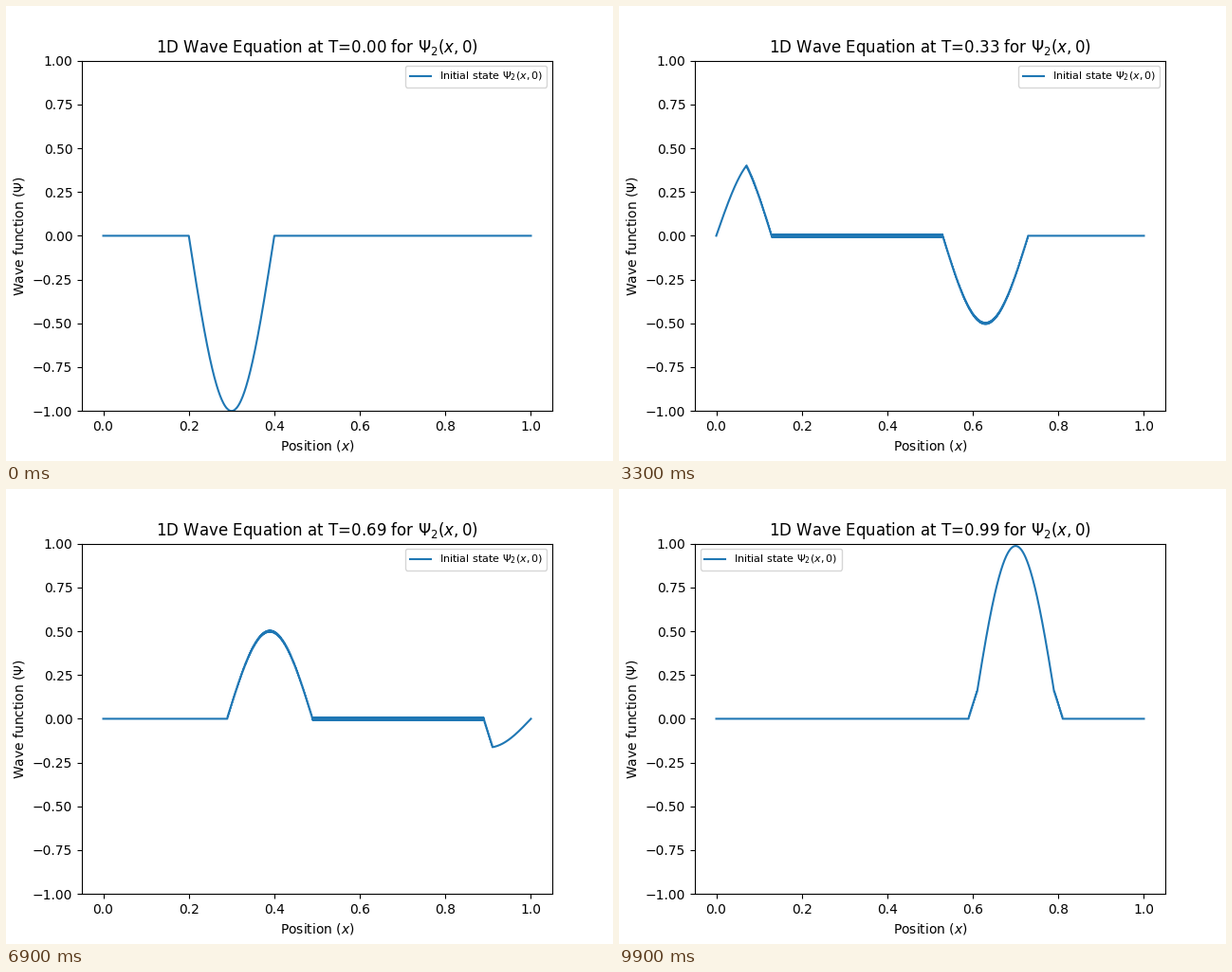
Write a matplotlib script that moves like this. It is 640 by 480 pixels and loops after 10 s.

```python
import numpy as np
import matplotlib.pyplot as plt
from matplotlib.animation import FuncAnimation

CELLS = 1000
FRAMES = 100
STEPS_PER_FRAME = 10

x = np.linspace(0, 1, CELLS + 1)


def initial_state(x):
    inside = (x >= 0.2) & (x <= 0.4)
    return np.where(inside, np.sin(5 * np.pi * x), 0.0)


def solve_wave(start, steps):
    """Leapfrog scheme with fixed ends, unit speed and dt = dx."""
    u = np.zeros((steps + 1, start.size))
    u[0] = u[1] = start
    for n in range(1, steps):
        u[n + 1, 1:-1] = u[n, 2:] + u[n, :-2] - u[n - 1, 1:-1]
    return u


wave = solve_wave(initial_state(x), FRAMES * STEPS_PER_FRAME)

fig, ax = plt.subplots(figsize=(6.4, 4.8), dpi=100)
line, = ax.plot(x, wave[0], label=r"Initial state $\Psi_2(x,0)$")
ax.set_ylim(-1, 1)
ax.set_xlabel("Position ($x$)")
ax.set_ylabel(r"Wave function ($\Psi$)")
title = ax.set_title("")
ax.legend(loc="best", fontsize=8)


def update(frame):
    line.set_ydata(wave[frame * STEPS_PER_FRAME])
    title.set_text(rf"1D Wave Equation at T={frame / FRAMES:.2f} for $\Psi_2(x,0)$")
    return line, title


anim = FuncAnimation(fig, update, frames=FRAMES, interval=100,
                     repeat=True, repeat_delay=0, blit=False)
plt.show()
```
